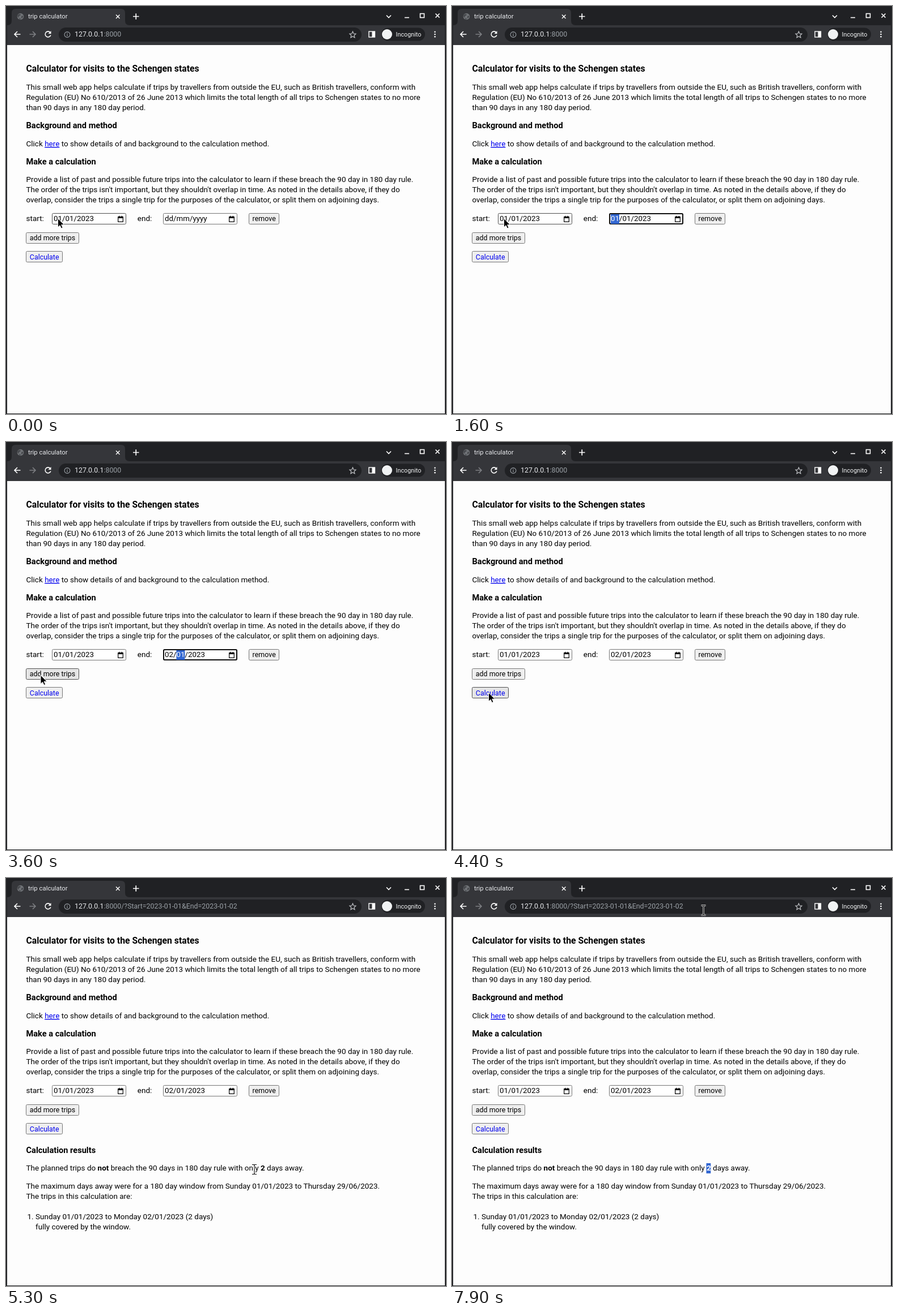
Write an HTML page that moves like this. It is 776 px wide and 721 px high and loops after 8000 ms.

```html
<!DOCTYPE html>
<html lang="en">
<head>
<meta charset="utf-8">
<title>trip calculator</title>
<style>
html, body { margin: 0; width: 100%; height: 100%; overflow: hidden; background: #202124; }
svg { display: block; font-family: Roboto, sans-serif; }
.page { font-size: 13.5px; }
.page text, .field text { white-space: pre; }
.h2 { font-size: 15.78px; font-weight: 700; }
.h3 { font-size: 14.6px; font-weight: 700; }
.b { font-weight: 700; }
.link { fill: #00e; text-decoration: underline 1px; text-underline-offset: 1px; }
.btn text { font-size: 12.45px; text-anchor: middle; }
.btn rect { fill: #efefef; stroke: #767676; }
.btn.hover rect { fill: #e5e5e5; stroke: #4f4f4f; }
.field { font-size: 13.333px; }
.box { fill: #fff; stroke: #767676; }
.hover .box { stroke: #4f4f4f; }
.ring { fill: none; stroke: #101010; stroke-width: 2; }
.sel { fill: #3367d1; }
.icon { fill: none; stroke: #fff; stroke-width: 1.6; }
</style>
</head>
<body>
<svg width="776" height="721" viewBox="0 0 776 721">
  <rect width="776" height="721" fill="#202124"/>
  <path d="M2 69V34Q10 34 10 26V12Q10 5 17 5H203Q210 5 210 12V26Q210 34 218 34H774V69Z" fill="#35363a"/>
  <rect x="2" y="69" width="772" height="651" fill="#fdfdfd"/>

  <!-- tab strip -->
  <circle cx="25.5" cy="18.5" r="5.8" fill="#6f7276"/>
  <path d="M21 15l4-1 1 2-3 2-1 3-2-3zM27 18l3-1v3l-3 2zM24 21l2 1-1 2-2-1z" fill="#46484c"/>
  <text x="39" y="22" font-size="11.4" fill="#e8eaed">trip calculator</text>
  <g class="icon">
    <path d="M194 15.5l6.5 6.5M200.5 15.5l-6.5 6.5" stroke-width="1.4"/>
    <path d="M224 18.5h10.5M229.25 13.25v10.5" stroke-width="1.7"/>
    <path d="M671 16.5l4 4 4-4"/>
    <path d="M703 20.5h8"/>
    <rect x="730.5" y="13.5" width="7" height="7"/>
    <path d="M757.5 13.5l7 7M764.5 13.5l-7 7"/>
  </g>

  <!-- toolbar -->
  <rect x="93" y="38" width="534" height="25" rx="12.5" fill="#202124"/>
  <rect x="662" y="38.5" width="77" height="23" rx="11.5" fill="#202124"/>
  <g class="icon">
    <path d="M25.5 50H15.5M20 45l-5 5 5 5"/>
    <path d="M41.5 50h10M47 45l5 5-5 5" stroke="#7d7f83"/>
    <path d="M78 46.7A5 5 0 1 0 78.9 51.5"/>
    <path d="M79.5 44v5h-5z" fill="#fff" stroke="none"/>
    <circle cx="108" cy="50.5" r="4.9" stroke="#9aa0a6" stroke-width="1.1"/>
    <path d="M108 49.8v3.5M108 47.5v1.2" stroke="#9aa0a6" stroke-width="1.2"/>
    <path d="M611.5 45l1.6 3.7 4 .4-3 2.7 .9 4-3.5-2.1-3.5 2.1 .9-4-3-2.7 4-.4z" stroke="#c6c8cb" stroke-width="1.1"/>
    <rect x="640" y="45" width="10.5" height="10" stroke-width="1.4"/>
    <path d="M645.5 45h5v10h-5z" fill="#fff" stroke="none"/>
  </g>
  <circle cx="672" cy="50" r="9" fill="#f1f3f4"/>
  <text x="687.5" y="54" font-size="10.8" fill="#f1f3f4">Incognito</text>
  <g fill="#fff">
    <circle cx="756.5" cy="45.7" r="1.3"/><circle cx="756.5" cy="50" r="1.3"/><circle cx="756.5" cy="54.3" r="1.3"/>
  </g>
  <text x="121" y="54" font-size="12.36" fill="#9aa0a6"><tspan fill="#e8eaed">127.0.0.1</tspan>:8000<tspan id="query">/?Start=2023-01-01&amp;End=2023-01-02</tspan></text>

  <g class="page">
    <text class="h2" x="35.5" y="116">Calculator for visits to the Schengen states</text>
    <text x="35.5" y="148">This small web app helps calculate if trips by travellers from outside the EU, such as British travellers, conform with</text>
    <text x="35.5" y="166">Regulation (EU) No 610/2013 of 26 June 2013 which limits the total length of all trips to Schengen states to no more</text>
    <text x="35.5" y="184">than 90 days in any 180 day period.</text>
    <text class="h3" x="35.5" y="216">Background and method</text>
    <text x="35.5" y="248">Click <tspan class="link">here</tspan> to show details of and background to the calculation method.</text>
    <text class="h3" x="35.5" y="280">Make a calculation</text>
    <text x="35.5" y="311">Provide a list of past and possible future trips into the calculator to learn if these breach the 90 day in 180 day rule.</text>
    <text x="35.5" y="329">The order of the trips isn't important, but they shouldn't overlap in time. As noted in the details above, if they do</text>
    <text x="35.5" y="347">overlap, consider the trips a single trip for the purposes of the calculator, or split them on adjoining days.</text>
    <text x="35.5" y="380">start:</text>
    <text x="231.8" y="380">end:</text>

    <g class="btn"><rect x="428.5" y="366.5" width="53" height="19" rx="2"/><text x="455.2" y="380">remove</text></g>
    <g class="btn" id="add"><rect x="35.5" y="400.5" width="93" height="19" rx="2"/><text x="82" y="414">add more trips</text></g>
    <g class="btn" id="calc"><rect x="35.5" y="433.5" width="64" height="19" rx="2"/><text x="67.7" y="448" fill="#00e">Calculate</text></g>

    <g id="results">
      <rect class="sel" id="mark" x="448.5" y="504" width="7.8" height="18"/>
      <text class="h3" x="35.5" y="486">Calculation results</text>
      <text x="35.5" y="517">The planned trips do <tspan class="b">not</tspan> breach the 90 days in 180 day rule with only <tspan class="b" id="two">2</tspan> days away.</text>
      <text x="35.5" y="549">The maximum days away were for a 180 day window from Sunday 01/01/2023 to Thursday 29/06/2023.</text>
      <text x="35.5" y="567">The trips in this calculation are:</text>
      <text x="37.5" y="603">1.</text>
      <text x="52" y="603">Sunday 01/01/2023 to Monday 02/01/2023 (2 days)</text>
      <text x="52" y="621">fully covered by the window.</text>
    </g>
  </g>

  <g class="field" id="start" transform="translate(81 366)"></g>
  <g class="field" id="end" transform="translate(277 366)"></g>

  <path id="arrow" d="M0 0V15.5L3.6 12.2 6 17.6 8.6 16.5 6.2 11.2H11.2Z" fill="#000" stroke="#fff"/>
  <g id="beam" fill="none">
    <path d="M-4-8.5h3l1 1 1-1h3M-4 8.5h3l1-1 1 1h3M0-7.5v15" stroke="#fff" stroke-width="2.4"/>
    <path d="M-4-8.5h3l1 1 1-1h3M-4 8.5h3l1-1 1 1h3M0-7.5v15" stroke="#000" stroke-width="1.1"/>
  </g>
</svg>
<script>
const LOOP = 8000, STEP = 100;
const $ = id => document.getElementById(id);
const show = (id, on) => $(id).style.display = on ? '' : 'none';

// Pointer moves: first step, last step, x, y, shape on the way
const moves = [
  [0, 0, 91.5, 375.5, 'arrow'],
  [3200, 3200, 62, 409, 'arrow'],
  [3400, 3400, 60, 412, 'arrow'],
  [3600, 3600, 61, 412, 'arrow'],
  [3800, 3900, 62, 429.5, 'arrow'],
  [4100, 4200, 64.5, 443, 'arrow'],
  [4700, 5000, 330, 517, 'arrow'],
  [5100, 5100, 400, 522, 'arrow'],
  [5200, 5300, 438, 515, 'beam'],
  [5400, 5500, 438, 516, 'beam'],
  [5600, 5700, 452.5, 512, 'beam'],
  [5900, 5900, 453, 513, 'beam'],
  [6200, 6200, 452, 515, 'beam'],
  [6400, 6500, 458.5, 516, 'beam'],
  [7000, 7000, 457.5, 513, 'beam'],
  [7100, 7300, 438, 190, 'arrow'],
  [7400, 7500, 443.5, 60, 'beam'],
  [7800, 7900, 443.5, 57, 'beam']
];

function pointer(t) {
  let [, , x, y, shape] = moves[0];
  for (const [from, to, nx, ny, kind] of moves) {
    if (t < from) break;
    const p = Math.min(1, (t - from + STEP) / (to - from + STEP));
    x += (nx - x) * p;
    y += (ny - y) * p;
    shape = kind;
  }
  return { x, y, shape };
}

// part: index of the highlighted piece of the date, or -1 when unfocused
function drawField(id, date, part, hover) {
  const left = [3, 23.46, 43.92][part], width = part === 2 ? 29.95 : 14.97;
  const focus = part >= 0;
  const text = date.split('/').map((s, i) =>
    `<tspan fill="${i === part ? '#fff' : '#000'}">${s}</tspan>`).join('/');
  $(id).classList.toggle('hover', hover);
  $(id).innerHTML =
    `<rect class="box" x=".5" y=".5" width="130" height="19" rx="2"/>` +
    (focus ? `<rect class="ring" x="1" y="1" width="129" height="18" rx="2"/>
      <rect class="sel" x="${left}" y="2" width="${width}" height="17"/>` : '') +
    `<text x="3" y="14">${text}</text>
    <path d="M116.7 7.5h8.6v7.8h-8.6z" fill="none" stroke="#000" stroke-width="1.2"/>
    <path d="M116.2 6h9.6v3h-9.6zM118 4.7h1.3v2H118zM122.7 4.7h1.3v2h-1.3z"/>`;
}

const within = (t, a, b) => t >= a && t < b;

function draw(t) {
  const startPart = within(t, 400, 1600) ? (t >= 700) + (t >= 1200) : -1;
  const endPart = within(t, 1600, 4400) ? +(t >= 2900) : -1;
  const endDate = t < 1600 ? 'dd/mm/yyyy' : t < 2300 ? '01/01/2023' : '02/01/2023';
  drawField('start', '01/01/2023', startPart, t < 3200);
  drawField('end', endDate, endPart, false);

  $('add').classList.toggle('hover', within(t, 3200, 3900));
  $('calc').classList.toggle('hover', within(t, 4200, 4700));
  show('results', t >= 4500);
  show('query', t >= 4500);
  show('mark', t >= 6400);
  $('two').setAttribute('fill', t >= 6400 ? '#fff' : '#000');

  const { x, y, shape } = pointer(t);
  for (const id of ['arrow', 'beam']) show(id, id === shape);
  $(shape).setAttribute('transform', `translate(${x} ${y})`);
}

let last = -1;
function tick() {
  const t = Math.floor(performance.now() % LOOP / STEP) * STEP;
  if (t !== last) draw(last = t);
  requestAnimationFrame(tick);
}
tick();
</script>
</body>
</html>
```
